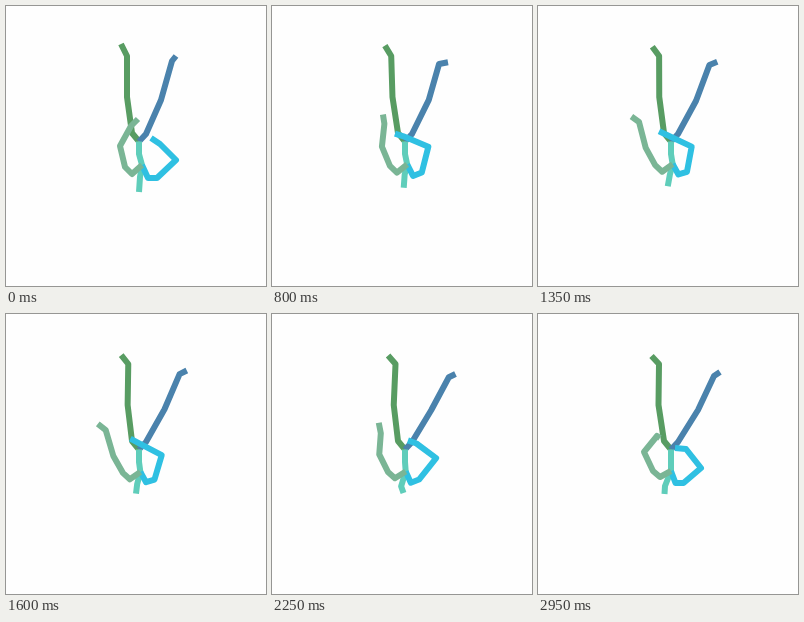
An HTML page that plays this animation: 260x280 px, repeating every 3 s.

```html
<!DOCTYPE html>
<html lang="en">
<head>
<meta charset="utf-8">
<title>Stick figure</title>
<style>
  html, body { margin: 0; width: 100%; height: 100%; overflow: hidden; background: #fefefe; }
  svg { display: block; width: 260px; height: 280px; }
  polyline { fill: none; stroke-width: 6; stroke-linejoin: round; }
</style>
</head>
<body>
<svg id="stage" viewBox="0 0 260 280"></svg>
<script>
const LOOP = 3000, STEP = 50;

// Every motion runs over p = 0..1 and is added to a joint's starting point.
const motions = {
  drift: p => p,
  swing: p => Math.sin(Math.PI * p) ** 2,
  wave: p => Math.sin(2 * Math.PI * p),
  ripple: p => Math.sin(2 * Math.PI * p) ** 2
};

const joint = (x, y, moves = {}) => p => {
  let px = x, py = y;
  for (const [name, [dx, dy]] of Object.entries(moves)) {
    const amount = motions[name](p);
    px += dx * amount;
    py += dy * amount;
  }
  return `${px.toFixed(2)},${py.toFixed(2)}`;
};

const root = joint(133, 135.5);
const chest = joint(136, 159, { drift: [-3, -2] });

const leftLeg = {
  color: "#589c62",
  joints: [
    joint(115, 38, { drift: [-1.5, 4], swing: [0.5, 1], wave: [-2, 0] }),
    joint(121, 50, { swing: [0.7, 0], wave: [-2.2, 0] }),
    joint(121, 91, { drift: [-0.5, 0], swing: [0.7, 0], wave: [-0.8, 0] }),
    joint(126, 127),
    root
  ]
};

const rightLeg = {
  color: "#4a82ac",
  joints: [
    joint(170, 50, { drift: [12, 8], swing: [4, 2], wave: [-1, 0], ripple: [1.5, 3] }),
    joint(166, 55, { drift: [10, 7], swing: [1.5, 1], wave: [-2.5, -1], ripple: [0, 1.5] }),
    joint(155, 94, { drift: [5, 2], swing: [0.8, 0], wave: [0, -0.7] }),
    joint(140, 128),
    root
  ]
};

const spine = {
  color: "#5fcdba",
  joints: [
    root,
    joint(133, 148),
    chest,
    joint(134, 171, { drift: [-7, 1], swing: [1, -2], wave: [0, -1.5] }),
    joint(133, 186, { drift: [-6.5, -6], swing: [0, -3], wave: [-1.5, 0], ripple: [2, -1] })
  ]
};

const rightArm = {
  color: "#2fc0e2",
  joints: [
    chest,
    joint(142, 172, { drift: [-4.5, -3], swing: [0.5, -2.2] }),
    joint(151, 172, { drift: [-5.5, -3], swing: [0.5, -4.8], ripple: [0, -2] }),
    joint(170, 154, { drift: [-7, 0], swing: [-12, -13], wave: [-5, -1], ripple: [0, -5] }),
    joint(154, 138, { drift: [-6, -3], swing: [-19.5, -7], wave: [-7, 0], ripple: [-3, -3] }),
    joint(145, 132, { drift: [-8, 2], swing: [-18.5, -8], wave: [-7.5, 1.5], ripple: [-2, -2] })
  ]
};

const leftArm = {
  color: "#7ab595",
  joints: [
    chest,
    joint(126, 168, { drift: [-4, -5] }),
    joint(119, 161, { drift: [-4, -4] }),
    joint(114, 140, { drift: [-8, -2], swing: [-2.5, 3], wave: [-0.5, -0.5] }),
    joint(125, 120, { drift: [-6, 2], swing: [-22, -5], wave: [1.5, 0] }),
    joint(132, 113, { drift: [-10, 11], swing: [-35, -8], wave: [1.5, 3], ripple: [0, -6] })
  ]
};

const stage = document.getElementById("stage");
const limbs = [leftLeg, rightLeg, spine, rightArm, leftArm].map(({ color, joints }) => {
  const line = document.createElementNS(stage.namespaceURI, "polyline");
  line.setAttribute("stroke", color);
  stage.append(line);
  return { line, joints };
});

function draw(t) {
  const p = Math.floor(t / STEP) * STEP / (LOOP - STEP);
  for (const { line, joints } of limbs) {
    line.setAttribute("points", joints.map(at => at(p)).join(" "));
  }
}

const start = performance.now();
function tick() {
  draw((performance.now() - start) % LOOP);
  requestAnimationFrame(tick);
}
tick();
</script>
</body>
</html>
```
